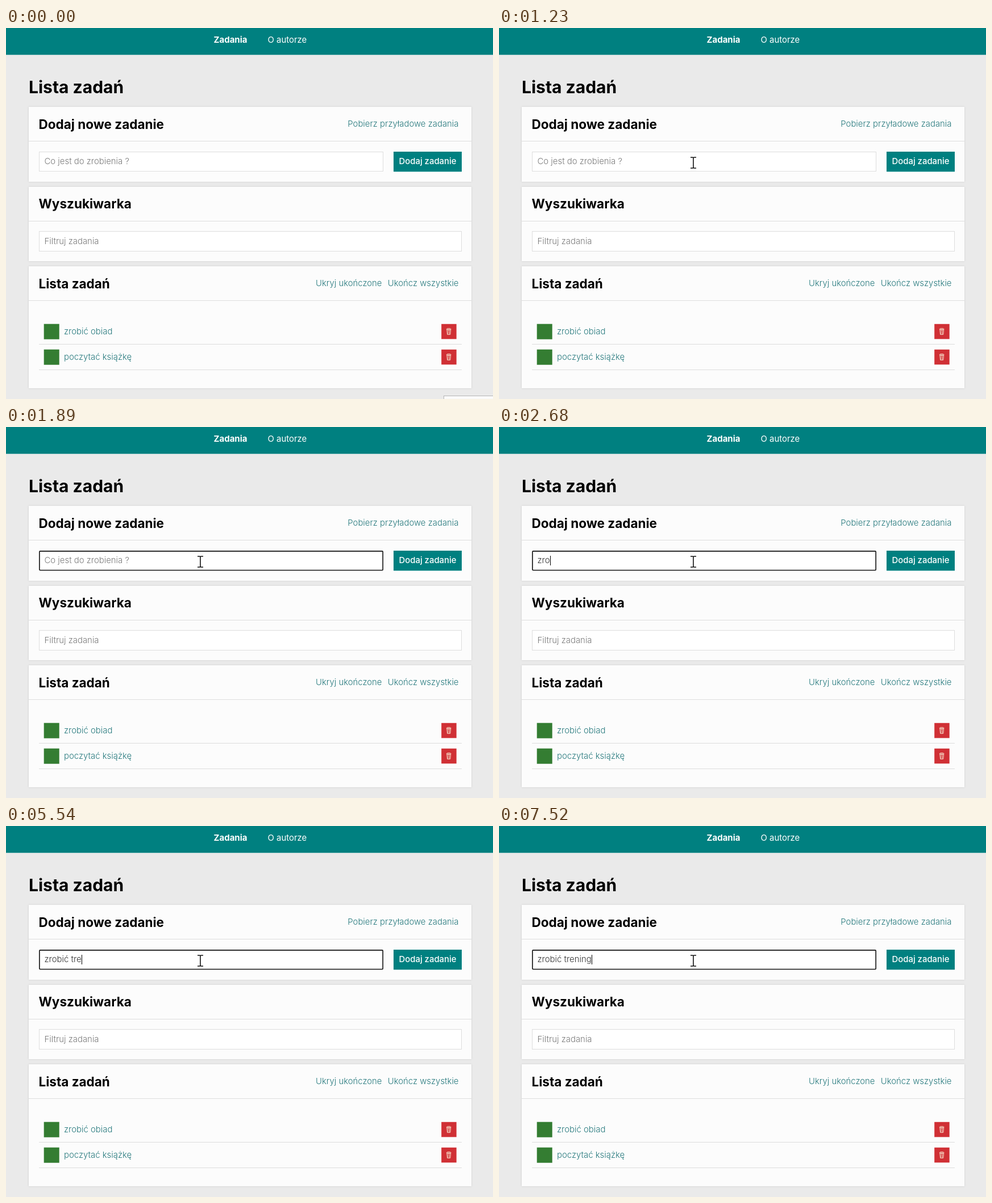
An HTML page for the animation above (7990 ms loop, 857 px wide and 654 px high).

```html
<!DOCTYPE html>
<html lang="pl">
<head>
<meta charset="utf-8">
<title>Lista zadań</title>
<style>
html, body { margin: 0; width: 100%; height: 100%; overflow: hidden; background: #eaeaea; }
svg { display: block; width: 857px; height: 654px; }
text { font: 350 14.9px Inter, "Open Sans", sans-serif; white-space: pre; }
.h1 { font-size: 30px; font-weight: 700; }
.h2 { font-size: 22.5px; font-weight: 700; }
.nav { fill: #fff; font-weight: 400; }
.bold { font-size: 15px; font-weight: 700; }
.mid { font-weight: 450; text-anchor: middle; fill: #fff; }
.link { fill: #26797d; }
.end { text-anchor: end; }
.hint { fill: #7b7b7b; }
.teal { fill: #008080; }
.card { fill: #fcfcfc; filter: drop-shadow(0 0 1.5px #ccc); }
.line { fill: #ddd; }
.field { fill: #fff; stroke: #ddd; }
.ring { fill: none; stroke: #101010; stroke-width: 1.6; }
</style>
</head>
<body>
<svg viewBox="0 0 857 654">
  <defs>
    <g id="bin">
      <rect width="26.5" height="26.5" fill="#d03035"/>
      <g fill="none" stroke="#f6dcc8">
        <path d="M9.5 9.5l1 9h5l1-9z"/>
        <path d="M11.8 10v8M14.2 10v8" stroke-width=".9"/>
        <ellipse cx="13" cy="9" rx="3.9" ry="1.3"/>
      </g>
    </g>
  </defs>

  <rect class="teal" width="857" height="47.3"/>
  <text class="nav bold" x="365.5" y="26">Zadania</text>
  <text class="nav" x="460.5" y="26">O autorze</text>
  <text class="h1" x="40" y="114.5">Lista zadań</text>

  <rect class="card" x="40" y="139" width="779" height="132"/>
  <rect class="line" x="40" y="199" width="779" height="1"/>
  <text class="h2" x="57.5" y="177.5">Dodaj nowe zadanie</text>
  <text class="link end" x="796.5" y="174">Pobierz przyładowe zadania</text>
  <rect class="field" x="58.5" y="218.5" width="605" height="34"/>
  <rect class="ring" id="ring" x="58.9" y="218.9" width="604.3" height="33.6" rx="1.5"/>
  <text class="hint" id="hint" x="67.5" y="240">Co jest do zrobienia ?</text>
  <text id="typed" x="67.5" y="240" fill="#333"></text>
  <rect id="caret" y="227" width="1" height="17"/>
  <rect class="teal" x="682" y="218" width="120" height="35.3"/>
  <text class="mid" x="742" y="240">Dodaj zadanie</text>

  <rect class="card" x="40" y="280" width="779" height="131"/>
  <rect class="line" x="40" y="340" width="779" height="1"/>
  <text class="h2" x="57.5" y="318">Wyszukiwarka</text>
  <rect class="field" x="58.5" y="358.5" width="743" height="35"/>
  <text class="hint" x="67.5" y="381">Filtruj zadania</text>

  <rect class="card" x="40" y="420" width="779" height="215"/>
  <rect class="line" x="40" y="480" width="779" height="1"/>
  <text class="h2" x="57.5" y="458.5">Lista zadań</text>
  <text class="link end" x="661.5" y="455">Ukryj ukończone</text>
  <text class="link end" x="796.5" y="455">Ukończ wszystkie</text>

  <g fill="#347d32">
    <rect x="66.7" y="521.7" width="27" height="27"/>
    <rect x="66.7" y="566.7" width="27" height="27"/>
  </g>
  <text class="link" x="102" y="540">zrobić obiad</text>
  <text class="link" x="102" y="585">poczytać książkę</text>
  <use href="#bin" x="766.2" y="521.8"/>
  <use href="#bin" x="766.2" y="566.8"/>
  <rect class="line" x="58" y="557" width="744" height="1"/>
  <rect class="line" x="58" y="602" width="744" height="1"/>

  <rect id="popup" x="770.5" y="648.5" width="90" height="10" fill="#fafafa" stroke="#b5b5b5"/>

  <g id="arrow">
    <path d="M.5.5V19l4.4-4 3 6.6 2.7-1.2-2.9-6.2h6z" fill="#fff" stroke="#111"/>
  </g>
  <g id="beam">
    <path d="M-5-9h4l1 1 1-1h4M0-8V9M-5 10h4l1-1 1 1h4" fill="none" stroke="#111" stroke-width="1.6"/>
  </g>
</svg>
<script>
const LOOP = 7990, MOVE = 530, STEP = 70, FOCUS = 1360;
const el = id => document.getElementById(id);
const [ring, hint, typed, caret, popup, arrow, beam] =
  ["ring", "hint", "typed", "caret", "popup", "arrow", "beam"].map(el);

const phrase = "zrobić trening";
const keys = [2020, 2350, 2680, 3010, 3290, 4220, 4620, 5080, 5280, 5540, 5810, 6070, 6280, 6530];
const caretOff = [[1890, 2020], [3820, 4220], [7060, 7520]];
const path = [
  [751, 634], [714, 562], [640, 482], [535, 407], [425, 345], [378, 310],
  [366, 291], [356, 270], [346, 249], [343, 240], [342, 237]
];

const show = (node, on) => { node.style.visibility = on ? "visible" : "hidden"; };

function drawPointer(t) {
  const i = Math.min(path.length - 1, Math.max(0, Math.floor((t - MOVE) / STEP)));
  const [x, y] = path[i];
  const overField = y < 253;
  for (const node of [arrow, beam]) node.setAttribute("transform", `translate(${x} ${y})`);
  show(arrow, t >= MOVE && !overField);
  show(beam, t >= MOVE && overField);
}

function drawField(t) {
  const count = keys.filter(k => k <= t).length;
  const text = phrase.slice(0, count);
  if (typed.textContent !== text) typed.textContent = text;
  const width = count ? typed.getComputedTextLength() : 0;
  caret.setAttribute("x", Math.round(67.5 + width));
  show(hint, !count);
  show(ring, t >= FOCUS);
  show(caret, t >= FOCUS && !caretOff.some(([a, b]) => t >= a && t < b));
}

function draw(t) {
  show(popup, t < 70);
  drawPointer(t);
  drawField(t);
}

const start = performance.now();
function tick(now) {
  draw(Math.max(0, now - start) % LOOP);
  requestAnimationFrame(tick);
}
draw(0);
requestAnimationFrame(tick);
</script>
</body>
</html>
```
